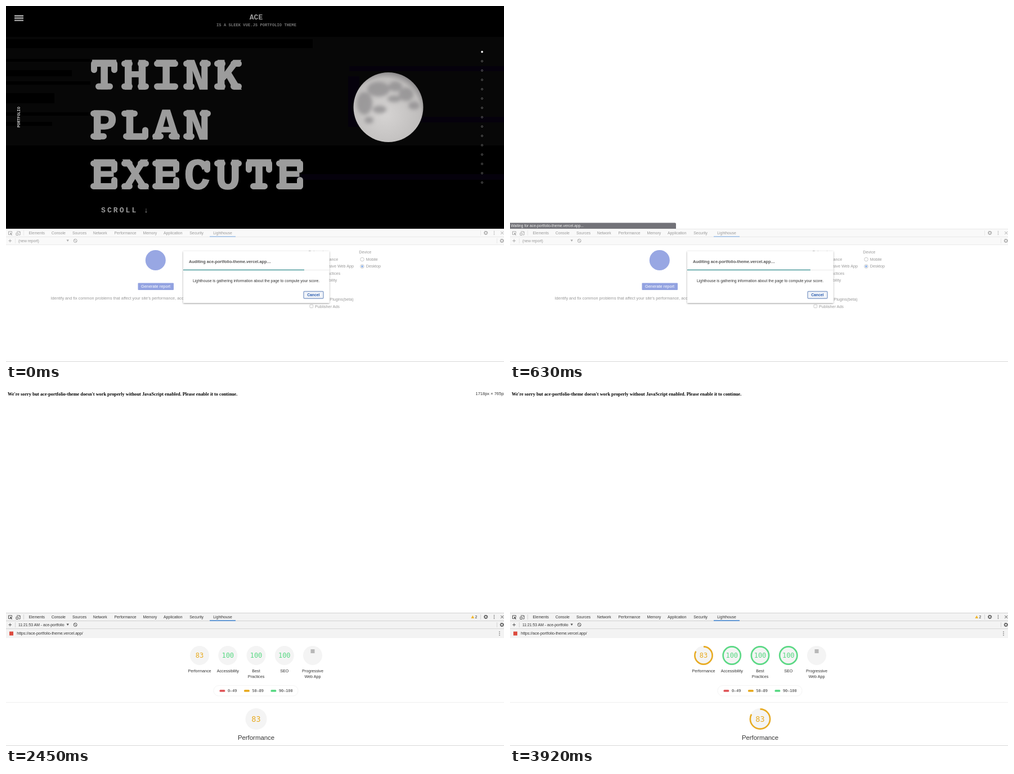
These frames come from a looping animation (885 by 633 pixels, 4.27 s). An HTML page:

```html
<!DOCTYPE html>
<html lang="en">
<head>
<meta charset="utf-8">
<title>Lighthouse audit</title>
<style>
  html, body { margin: 0; width: 885px; height: 633px; overflow: hidden; background: #fff; }
  svg { display: block; font: 7.2px "Liberation Sans", Arial, sans-serif; fill: #333; }
  .slab { font-family: "Liberation Mono", "Courier New", monospace; font-weight: bold; fill: #9c9c9c; }
  .mono { font-family: "DejaVu Sans Mono", monospace; }
  .mid { text-anchor: middle; }
  .bold { font-weight: bold; }
  .line { fill: none; stroke: #555; stroke-width: 1; }
  .rule { fill: none; stroke: #ccc; stroke-width: .8; }
</style>
</head>
<body>
<svg id="stage" width="885" height="633" viewBox="0 0 885 633">
  <defs>
    <radialGradient id="moonlight" cx=".45" cy=".6" r=".6">
      <stop offset="0" stop-color="#d6d4d3"/><stop offset=".85" stop-color="#bfbdbc"/><stop offset="1" stop-color="#8e8c8d"/>
    </radialGradient>
    <filter id="soft" x="-20%" y="-20%" width="140%" height="140%"><feGaussianBlur stdDeviation="3"/></filter>
    <filter id="shadow"><feDropShadow dx="0" dy="1" stdDeviation="1.8" flood-opacity=".4"/></filter>
    <clipPath id="disc"><circle cx="679.5" cy="180" r="62"/></clipPath>
  </defs>

  <g id="site">
    <path fill="#000" d="M0 0h885v396H0z"/>
    <path fill="#070707" d="M0 55h885v193H0z"/>
    <path fill="#000" d="M0 59h545v16H0zM0 94h150v5H0zM0 114h117v11H0zM0 134h150v6H0zM0 155h86v18H0zM0 189h150v6H0zM0 206h82v7H0z"/>
    <path fill="#05010c" d="M610 107h275v9H610zM610 197h275v10H610zM515 299h370v10H515zM608 125h20v90h-20z"/>
    <path stroke="#aaa" stroke-width="2.3" d="M15 17.5h16m-16 4h16m-16 4.2h16"/>
    <text class="slab mid" x="444.5" y="24" font-size="13">ACE</text>
    <text class="slab mid" x="445" y="36" font-size="7" letter-spacing=".1" style="fill:#777">IS A SLEEK VUE.JS PORTFOLIO THEME</text>
    <text class="slab" transform="translate(25 216) rotate(-90)" font-size="6.8" style="fill:#ccc">PORTFOLIO</text>
    <g id="moon">
      <circle cx="679.5" cy="180" r="62" fill="url(#moonlight)"/>
      <g clip-path="url(#disc)"><g filter="url(#soft)" fill="#8d8b8d" opacity=".75">
        <ellipse cx="662" cy="148" rx="20" ry="13"/><ellipse cx="692" cy="143" rx="12" ry="9"/>
        <ellipse cx="711" cy="157" rx="13" ry="12"/><ellipse cx="637" cy="173" rx="14" ry="20"/>
        <ellipse cx="725" cy="177" rx="10" ry="7"/><ellipse cx="664" cy="184" rx="12" ry="7"/>
        <ellipse cx="690" cy="165" rx="12" ry="6"/><ellipse cx="645" cy="203" rx="8" ry="6"/>
      </g></g>
    </g>
    <g id="headline"></g>
    <text id="scroll" class="slab" x="169" font-size="13" letter-spacing="3.1">SCROLL ↓</text>
    <g id="dots"></g>
  </g>
  <text id="noscript" class="bold" x="3" y="10.3" font-size="8.28" style="font-family:'Liberation Serif',Times,serif;fill:#000">We're sorry but ace-portfolio-theme doesn't work properly without JavaScript enabled. Please enable it to continue.</text>
  <text id="size" x="834.5" y="8.5" font-size="7.5">1718px × 765px</text>
  <g id="status">
    <path fill="#43434b" d="M0 385.5h293q2 0 2 2V396H0z"/>
    <text x="1.5" y="393" font-size="6.7" fill="#eee">Waiting for ace-portfolio-theme.vercel.app...</text>
  </g>

  <g id="tools">
    <path fill="#f3f3f3" d="M0 396h885v28.5H0z"/>
    <path class="rule" d="M0 396.5h885M0 410.5h885M0 424.5h885M31.5 399v9M843.5 399v9M16.5 413v9M872.5 413v9"/>
    <path fill="#3b82d0" d="M362 409.2h46v1.6h-46z"/>
    <g id="tabs" font-size="6.85"></g>
    <path class="line" d="M7 406.5H4.5v-5.5h6v2.5M19 401h5.5v2M18 403.5h3.5v4H18zM23 407h2v-6"/>
    <path fill="#444" d="M7 403l4.5 2-2 .6 1.5 1.8-.8.6-1.5-1.8-.8 1.6z"/>
    <path class="line" d="M4.5 417.5h5.5M7.2 414.7v5.5M879.2 401l5 5m0-5l-5 5"/>
    <path class="line" d="M121 415.2l4.4 4.4"/><circle class="line" cx="123.2" cy="417.4" r="3"/>
    <path fill="#555" d="M107.5 415.6h4.4l-2.2 3.4z"/>
    <g id="gears"></g>
    <g fill="#555"><circle cx="867.5" cy="400.7" r=".8"/><circle cx="867.5" cy="403.5" r=".8"/><circle cx="867.5" cy="406.3" r=".8"/></g>
    <g id="warning"><path fill="#f0b72f" d="M829.3 400.8l2.9 5.2h-5.8z"/><text x="833.6" y="406" font-size="6.8">2</text></g>
    <text id="run" x="22" y="419.8" font-size="6.85"></text>
  </g>

  <g id="setup">
    <circle cx="265.8" cy="452" r="18" fill="#304fc8"/>
    <rect x="234.5" y="492.5" width="63.5" height="12.5" rx="1" fill="#2444c4"/>
    <text class="mid" x="266" y="501.3" font-size="7.4" fill="#fff">Generate report</text>
    <text x="79.5" y="521.7" font-size="7.3">Identify and fix common problems that affect your site's performance, accessibility</text>
    <g id="options"></g>
    <g fill="#fff" stroke="#777" stroke-width=".8">
      <circle cx="633" cy="450.5" r="3.3"/><circle cx="633" cy="463" r="3.3"/><rect x="540" y="531" width="5.6" height="5.6" rx="1"/>
    </g>
    <circle cx="633" cy="463" r="1.9" fill="#1a66d8"/>
    <path fill="#fff" opacity=".5" d="M0 396h885v237H0z"/>
    <rect x="315" y="436" width="259.5" height="92" fill="#fff" filter="url(#shadow)"/>
    <text class="bold" x="325" y="457" font-size="7.33" fill="#555">Auditing ace-portfolio-theme.vercel.app…</text>
    <path class="rule" d="M315 469.5h259.5" style="stroke:#e4e4e4"/>
    <rect id="bar" x="315" y="468.6" height="1.5" fill="#4b9a9c"/>
    <text id="message" class="mid" x="444.6" y="491" font-size="6.83"></text>
    <rect x="529" y="507.5" width="35" height="12.5" rx="1.5" fill="#f1f4f9" stroke="#8ba3cc" stroke-width="1.4"/>
    <text class="mid bold" x="546.3" y="516.4" font-size="6.8" fill="#2a5db0">Cancel</text>
  </g>

  <g id="report">
    <path fill="#f3f3f3" d="M0 425h885v16H0z"/>
    <rect x="6" y="429.5" width="7" height="7" fill="#dc4a3e"/>
    <text x="19.3" y="435.2" font-size="7">https://ace-portfolio-theme.vercel.app/</text>
    <g fill="#555"><circle cx="877" cy="430" r=".8"/><circle cx="877" cy="433" r=".8"/><circle cx="877" cy="436" r=".8"/></g>
    <g id="gauges"></g>
    <circle cx="545" cy="472" r="17" fill="#f4f4f4"/><rect x="541.5" y="461" width="7" height="7" fill="#b8b8b8"/>
    <rect x="369" y="525.5" width="150" height="18.5" rx="9" fill="none" stroke="#f4f4f4"/>
    <g id="legend"></g>
    <path class="rule" d="M0 555.5h885" style="stroke:#ebebeb"/>
  </g>
  <path class="rule" d="M0 632.5h885"/>
</svg>
<script>
const $ = id => document.getElementById(id);
const LOOP = 4270, STEP = 70;
const ORANGE = '#e8ab22', GREEN = '#5bd985', RED = '#e0575a';
const text = (x, y, s, extra = '') => `<text x="${x}" y="${y}" ${extra}>${s}</text>`;

// Slab serifs laid over the headline letters, relative to the middle of each cell
const slabs = {
  a: 'M-19-46h9', b: 'M10-46h9', c: 'M-19-5.5h9', d: 'M10-5.5h9', e: 'M-10-5.5h20', f: 'M-16-46h32',
  g: 'M-16-5.5h32', h: 'M-18-46v11', i: 'M18-46v11', j: 'M18-5.5v-11', k: 'M-19-46h18', l: 'M-19-5.5h18'
};
const serifs = { T: 'fhie', H: 'abcd', I: 'fg', N: 'abc', K: 'abcd', P: 'al', L: 'kgj', A: 'cd', E: 'fgijac', X: 'abcd', C: 'i', U: 'ab' };
$('headline').innerHTML = ['THINK', 'PLAN', 'EXECUTE'].map((word, row) => {
  const y = 148.5 + row * 88.7;
  const bars = [...word].map((c, i) =>
    `<path transform="translate(${174.5 + i * 55} ${y})" d="${[...serifs[c]].map(k => slabs[k]).join('')}"/>`).join('');
  return text(151.4, y - .5, word, 'class="slab" font-size="77" letter-spacing="8.8" stroke="#9c9c9c" stroke-width="1.5"') +
    `<g fill="none" stroke="#9c9c9c" stroke-width="11" stroke-linecap="round">${bars}</g>`;
}).join('');

$('dots').innerHTML = Array.from({ length: 15 }, (_, i) =>
  `<circle cx="846" cy="${81.5 + i * 16.6}" r="1.5" stroke="${i ? '#888' : '#fff'}" stroke-width=".7" fill="${i ? 'none' : '#fff'}"/>`).join('');

const tabs = { Elements: 40.5, Console: 80.7, Sources: 118, Network: 154.7, Performance: 192.5, Memory: 243.5, Application: 280, Security: 326.3, Lighthouse: 368.3 };
$('tabs').innerHTML = Object.entries(tabs).map(([s, x]) => text(x, 406, s)).join('');

$('gears').innerHTML = [[852.7, 403.4], [881.3, 417.4]].map(([x, y]) =>
  `<g fill="none" stroke="#555"><circle cx="${x}" cy="${y}" r="2.2" stroke-width="1.2"/><circle cx="${x}" cy="${y}" r="3.2" stroke-width="1.1" stroke-dasharray="1.25"/></g>`).join('');

$('options').innerHTML = [
  [537, 439.5, 'Categories'], [549, 452.7, 'Performance'], [549, 465.2, 'Progressive Web App'],
  [549, 477.6, 'Best practices'], [549, 490, 'Accessibility'], [537, 523.7, 'Community Plugins(beta)'],
  [549, 536.7, 'Publisher Ads'], [627.3, 439.5, 'Device'], [639.7, 452.7, 'Mobile'], [639.7, 465.2, 'Desktop']
].map(a => text(...a)).join('');

const gauge = (x, y, r, score, size) => {
  const color = score < 90 ? ORANGE : GREEN;
  return `<circle cx="${x}" cy="${y}" r="${r}" fill="#f4f4f4"/>
    <circle class="arc" data-score="${score}" cx="${x}" cy="${y}" r="${r - 1.4}" pathLength="100" fill="none"
      stroke="${color}" stroke-width="2.6" transform="rotate(-90 ${x} ${y})"/>` +
    text(x, y + size * .36, score, `class="mono mid" font-size="${size}" fill="${color}"`);
};
const labels = ['Performance', 'Accessibility', 'Best Practices', 'SEO', 'Progressive Web_App'];
$('gauges').innerHTML = labels.map((label, i) => {
  const x = 344 + i * 50.25;
  return (i < 4 ? gauge(x, 472, 17, i ? 100 : 83, 12) : '') +
    label.split(' ').map((s, n) => text(x, 501.6 + n * 10.5, s.replace('_', ' '), 'class="mid"')).join('');
}).join('') + gauge(444.5, 585, 19, 83, 13.5) + text(444.5, 621.7, 'Performance', 'class="mid" font-size="11.4"');

$('legend').innerHTML = [[379.5, '0–49', RED], [423, '50–89', ORANGE], [470.5, '90–100', GREEN]].map(([x, s, c]) =>
  `<rect x="${x}" y="533" width="9.8" height="3.7" rx="1.5" fill="${c}"/>` +
  text(x + 14.5, 537.3, s, 'class="mono" font-size="6.8"')).join('');

const clamp = v => Math.max(0, Math.min(1, v));
const ramp = (t, a, b) => clamp((t - a) / (b - a));
const show = (id, on) => $(id).setAttribute('visibility', on ? 'visible' : 'hidden');

// CSS "ease": cubic-bezier(.25, .1, .25, 1)
function ease(x) {
  const curve = (u, p, q) => 3 * u * (1 - u) ** 2 * p + 3 * u * u * (1 - u) * q + u ** 3;
  let lo = 0, hi = 1;
  for (let i = 0; i < 20; i++) {
    const u = (lo + hi) / 2;
    curve(u, .25, .25) < x ? lo = u : hi = u;
  }
  return curve(lo, .1, 1);
}

const progress = [[0, 530], [210, 530.8], [280, 531.7], [980, 536], [1050, 536], [1120, 549], [1190, 562], [1470, 563], [1680, 564.3]];
function barEnd(t) {
  const i = progress.findIndex(p => p[0] > t);
  if (i < 0) return progress.at(-1)[1];
  const [[t0, x0], [t1, x1]] = [progress[i - 1], progress[i]];
  return x0 + (x1 - x0) * ramp(t, t0, t1);
}

function draw(t) {
  const done = t >= 2450, drift = ramp(t, 0, 210);
  show('site', t < 280);
  show('noscript', t >= 980);
  show('size', t >= 2310 && t < 3430);
  show('warning', t >= 1120);
  show('setup', !done);
  show('report', done);
  show('status', t >= 280 && t < 840);
  $('status').setAttribute('opacity', 1 - ramp(t, 560, 840));
  $('headline').setAttribute('transform', `translate(${1.6 * drift} 0)`);
  $('moon').setAttribute('transform', `translate(${.7 * drift} 0)`);
  $('scroll').setAttribute('y', 367 - 6 * drift);
  $('bar').setAttribute('width', barEnd(t) - 315);
  $('run').textContent = done ? '11:21:53 AM - ace-portfolio' : '(new report)';
  $('message').textContent = t < 1680
    ? 'Lighthouse is gathering information about the page to compute your score.'
    : 'Almost there! Lighthouse is now generating your report.';
  const fill = ease(ramp(t, 2715, 3715));
  for (const arc of document.querySelectorAll('.arc'))
    arc.setAttribute('stroke-dasharray', `${arc.dataset.score * fill} 200`);
}

const start = performance.now();
function tick() {
  const t = (performance.now() - start) % LOOP;
  draw(Math.floor(t / STEP) * STEP);
  requestAnimationFrame(tick);
}
tick();
</script>
</body>
</html>
```
